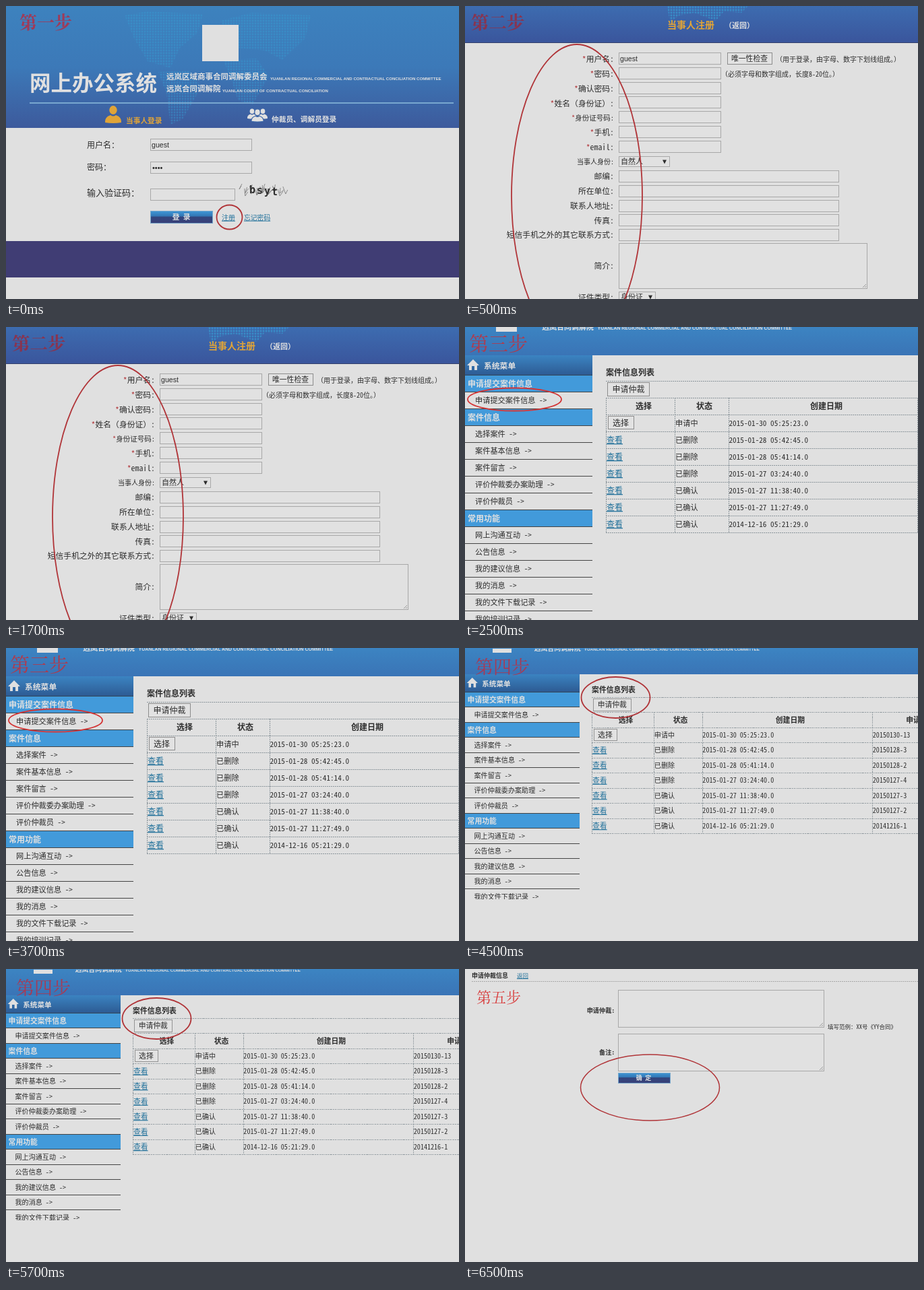
Animation of 672 by 435 pixels, one loop 8 s. Source, as an HTML page:

```html
<!DOCTYPE html>
<html lang="zh-CN">
<head>
<meta charset="utf-8">
<title>五步申请</title>
<style>
html, body { margin: 0; width: 100%; height: 100%; overflow: hidden; background: #e0e0e0; }
svg { display: block; width: 672px; height: 435px; }
rect { shape-rendering: crispEdges; }
text { font-family: "Noto Sans Mono CJK SC", "Noto Sans CJK SC", "Noto Sans CJK", monospace; white-space: pre; }
.arial { font-family: "Liberation Sans", Arial, sans-serif; }
.code { font-family: "DejaVu Sans Mono", monospace; }
.step { font-family: "Noto Serif CJK SC", "Noto Sans CJK SC", "Noto Sans CJK", serif; }
.link { fill: #20709a; text-decoration: underline; }
.grid { shape-rendering: crispEdges; }
</style>
</head>
<body>
<svg id="stage" viewBox="0 0 672 435"></svg>
<script>
const INK = '#2c2c2c', PALE = '#e0e0e0', GOLD = '#e0a438', RED = '#b03438';

// y is the vertical middle of the glyphs
const text = (x, y, size, str, fill = INK, more = '') =>
  `<text x="${x}" y="${y + size * .37}" font-size="${size}" fill="${fill}" ${more}>${str}</text>`;
const bold = (x, y, size, str, fill, more = '') => text(x, y, size, str, fill, 'font-weight="700" ' + more);
const arial = (x, y, size, str, fill) => text(x, y, size, str, fill, 'class="arial"');
const caps = (x, y, size, str) => bold(x, y, size, str, PALE, 'class="arial"');
const link = (x, y, size, str) => text(x, y, size, str, '', 'class="link"');
const step = (x, y, size, str, fill, weight = 600) =>
  text(x, y, size, str, fill, `class="step" font-weight="${weight}"`);
const rect = (x, y, w, h, fill, more = '') =>
  `<rect x="${x}" y="${y}" width="${w}" height="${h}" fill="${fill}" ${more}/>`;
const path = (d, stroke, more = '') => `<path d="${d}" fill="none" stroke="${stroke}" ${more}/>`;
const ring = (cx, cy, rx, ry, width = 1.8, color = RED) =>
  `<ellipse cx="${cx}" cy="${cy}" rx="${rx}" ry="${ry}" fill="none" stroke="${color}" stroke-width="${width}"/>`;
const field = (x, y, w, h) => rect(x + .5, y + .5, w - 1, h - 1, '#e1e1e1', 'stroke="#a8a8a8"');
const area = (x, y, w, h) => field(x, y, w, h) +
  path(`M${x + w - 7} ${y + h - 2}l5 -5m-2 5l2 -2`, '#888', 'stroke-width=".8"');
const button = (x, y, w, h) => rect(x + .5, y + .5, w - 1, h - 1, '#e2e2e2', 'stroke="#8c8c8c"');
const submit = (x, y, w, h, size, str, mid) =>
  rect(x, y, w, h, 'url(#glossy)', 'stroke="#78a8cc"') +
  bold(mid, y + h / 2 + .5, size, str, PALE, 'text-anchor="middle"');
const select = (x, y, w, str) => field(x, y, w, 16) + text(x + 3, y + 8, 11, str) +
  `<path d="M${x + w - 11} ${y + 5.5}h6l-3 6z" fill="${INK}"/>`;
const person = (x, y, s, fill) => `<g transform="translate(${x} ${y}) scale(${s})" fill="${fill}">
  <ellipse cy="-6.5" rx="5.7" ry="6.5"/><path d="M-12 12Q-13 4 -4 1Q0 4 4 1Q13 4 12 12Q0 14 -12 12z"/></g>`;

const gradient = (id, ...colors) => `<linearGradient id="${id}" x2="0" y2="1">${
  colors.map((c, i) => `<stop offset="${i / (colors.length - 1)}" stop-color="${c}"/>`).join('')}</linearGradient>`;
const defs = `<defs>
  ${gradient('banner', '#3d82be', '#3c79b8', '#3d5a9c')}
  ${gradient('strip', '#3d6cb0', '#3a559c')}
  ${gradient('top', '#3c84c2', '#3a74b6')}
  ${gradient('menu', '#3b84c2', '#2d5a92')}
  <linearGradient id="glossy" x2="0" y2="1"><stop stop-color="#3f98d8"/><stop offset=".45" stop-color="#3276b4"/>
    <stop offset=".5" stop-color="#32467e"/><stop offset="1" stop-color="#384078"/></linearGradient>
  <pattern id="dots" width="4" height="4" patternUnits="userSpaceOnUse"><circle cx="2" cy="2" r="1.4" fill="#369cd2"/></pattern>
</defs>`;

const ORG = '远岚区域商事合同调解委员会';
const ORG_EN = 'YUANLAN REGIONAL COMMERCIAL AND CONTRACTUAL CONCILIATION COMMITTEE';
const COURT = '远岚合同调解院';
const COURT_EN = 'YUANLAN COURT OF CONTRACTUAL CONCILIATION';
const USER = 'guest';

function login() {
  let noise = '';
  for (let i = 0; i < 17; i++) {
    const x = 350 + i * 3.8, y = 264 + (i * 7) % 9;
    noise += `M${x} ${y}l${(i * 5) % 9 - 4} ${8 + (i * 3) % 5}l${3 + i % 4} ${-5 - i % 3}`;
  }
  return rect(0, 0, 672, 181, 'url(#banner)') +
    `<path d="M176 14L210 8 292 12 284 40 258 62 244 92 210 82 190 48zM226 98L272 96 290 120 262 168 244 176 238 130z
      M318 22L364 10 452 14 444 48 410 80 384 66 340 62zM322 80L372 78 390 104 366 146 344 140 334 108z"
      fill="url(#dots)" opacity=".45"/>` +
    step(20, 24, 26, '第一步', '#a03a58') +
    rect(291, 28, 54, 54, PALE) +
    text(35, 114, 31.5, '网上办公系统', PALE, 'font-weight="900"') +
    bold(238, 105, 11.5, ORG, PALE) + caps(392, 108, 6.1, ORG_EN) +
    bold(238, 123, 11.5, COURT, PALE) + caps(321, 125.5, 6.1, COURT_EN) +
    path('M35 144H664', '#8cbcdc', 'stroke-width="1.5"') +
    person(159, 161, 1, GOLD) + bold(178, 170, 10.7, '当事人登录', GOLD) +
    person(365, 160, .58, PALE) + person(381, 160, .58, PALE) +
    `<g stroke="#3c66a8" stroke-width="1.5">${person(373, 162.5, .74, PALE)}</g>` +
    bold(394, 168, 10.7, '仲裁员、调解员登录', PALE) +
    text(120, 207, 12, '用户名：') + field(214, 197, 151, 18) + arial(216, 206.5, 10.6, USER) +
    text(120, 240, 12, '密码：') + field(214, 231, 151, 18) + arial(217, 240, 11, '••••') +
    text(120, 277, 13, '输入验证码：') + field(214, 271, 126, 18) +
    path(noise, '#777', 'stroke-width=".8"') +
    [...'bsyt'].map((c, i) => bold(361 + i * 11, 272 + i, 15, c, '#303030', 'class="code"')).join('') +
    submit(214, 304, 92, 18, 10.7, '登 录', 260) +
    link(320, 314, 10, '注册') + link(353, 314, 9.8, '忘记密码') +
    ring(331.5, 313.5, 19, 18) +
    rect(0, 349, 672, 54, '#403d74');
}

function register() {
  const labels = ['*用户名', '*密码', '*确认密码', '*姓名（身份证）', '*身份证号码', '*手机', '*email',
    '当事人身份', '邮编', '所在单位', '联系人地址', '传真', '短信手机之外的其它联系方式', '简介', '证件类型'];
  const rows = labels.map((str, i) => {
    const y = i < 13 ? 79 + i * 21.75 : i < 14 ? 386 : 432.5;
    const size = i == 4 ? 10.5 : i == 7 ? 10 : 11.8;
    const label = str.replace('*', `<tspan fill="${RED}">*</tspan>`) + ':';
    const box = i < 7 ? field(228, Math.round(y - 10), 152, 18)
      : i > 7 && i < 13 ? field(228, Math.round(y - 9), 327, 18) : '';
    return text(221, y, size, label, INK, 'text-anchor="end"') + box;
  }).join('');
  return rect(0, 0, 672, 55, 'url(#strip)') + rect(0, 54, 672, 1, '#34406c') +
    '<path d="M300 0H420L410 10 384 8 372 22 340 10 318 14 304 24z" fill="url(#dots)" opacity=".7"/>' +
    step(9, 24, 26.5, '第二步', '#883450') +
    bold(300, 28, 14, '当事人注册', GOLD) + bold(385, 29, 11, '（返回）', PALE) +
    rows + arial(230, 78.5, 10.6, USER) +
    button(389, 69, 67, 18) + text(395, 78.5, 10.8, '唯一性检查') +
    text(461, 79, 10, '（用于登录，由字母、数字下划线组成。）') +
    text(380, 101, 10, '（必须字母和数字组成，长度8-20位。）') +
    select(228, 223, 76, '自然人') + area(228, 352, 369, 68) + select(228, 424, 55, '身份证') +
    ring(166, 282, 97, 225);
}

function cases() {
  const side = 189.4;
  const menu = ['#申请提交案件信息', '申请提交案件信息', '#案件信息', '选择案件', '案件基本信息', '案件留言',
    '评价仲裁委办案助理', '评价仲裁员', '#常用功能', '网上沟通互动', '公告信息', '我的建议信息', '我的消息',
    '我的文件下载记录', '我的培训记录'].map((str, i) => {
    const y = 72 + i * 25;
    return (str[0] == '#'
      ? rect(0, y, side, 24, '#429ada') + bold(4, y + 12.5, 12, str.slice(1), PALE)
      : text(15, y + 12.3, 11.2, str + ' -&gt;')) + rect(0, y + 24, side, 1, '#444');
  }).join('');
  const list = ['申请中|2015-01-30 05:25:23.0|13', '已删除|2015-01-28 05:42:45.0|3', '已删除|2015-01-28 05:41:14.0|2',
    '已删除|2015-01-27 03:24:40.0|4', '已确认|2015-01-27 11:38:40.0|3', '已确认|2015-01-27 11:27:49.0|2',
    '已确认|2014-12-16 05:21:29.0|1'].map((row, i) => {
    const [state, date, n] = row.split('|'), y = 142.7 + i * 25;
    return (i ? link(210, y, 12, '查看') : button(212, 132, 39, 20) + text(219, y, 12, '选择')) +
      text(312, y, 11.2, state) + text(391.5, y, 11.2, date) +
      text(672, y, 11.2, date.slice(0, 10).replaceAll('-', '') + '-' + n);
  }).join('');
  let grid = 'M209 80.5H760M209.5 105V305M311.5 105V305M391.5 105V305M671.5 105V305';
  for (let y = 105.5; y < 306; y += 25) grid += `M209 ${y}H760`;
  const heads = [[265, '选择'], [355, '状态'], [536, '创建日期'], [751, '申请编号']]
    .map(([x, str]) => bold(x, 118, 12, str, INK, 'text-anchor="middle"')).join('');
  return rect(0, 0, 760, 42, 'url(#top)') + rect(46, -24, 31, 31, PALE) +
    bold(114, 0, 11, COURT, PALE) + caps(196.5, 1.5, 6.95, ORG_EN) +
    rect(0, 42, side, 30, 'url(#menu)') + rect(0, 71, side, 1, '#345') +
    `<path d="M3 57L12 48 21 57H18V64H14V58H10V64H6V57z" fill="${PALE}"/>` +
    bold(28, 58, 11.8, '系统菜单', PALE) + menu +
    bold(209, 68, 12, '案件信息列表') +
    path(grid, '#8c969c', 'class="grid" stroke-dasharray="2 1"') +
    button(211, 82, 63, 21) + text(218.5, 93, 12, '申请仲裁') + heads + list;
}

const pickMenu = () => cases() + step(6, 25, 29, '第三步', '#b03a4c', 500) + ring(73.5, 107.5, 69.5, 17, 1.8, '#d43434');

const pickButton = () => `<g transform="translate(0 .8) scale(.9)">${cases()}</g>` +
  rect(0, 0, 672, 1, '#3c84c2') + rect(0, 373, 672, 62, PALE) +
  step(15, 28, 27, '第四步', '#a83a54', 500) + ring(223.5, 73.5, 51, 30.5);

const apply = () => bold(10, 10, 9, '申请仲裁信息') + link(77, 10, 8.5, '返回') +
  path('M10 18.5H672', '#a8a8a8', 'class="grid" stroke-dasharray="2 1"') +
  step(17, 42, 22, '第五步', '#d83a3a', 400) +
  bold(222, 62, 9.2, '申请仲裁:', INK, 'text-anchor="end"') + area(227, 31, 306, 56) +
  text(538, 85.5, 8.5, '填写范例：XX号《YY合同》') +
  bold(222, 124, 9.2, '备注:', INK, 'text-anchor="end"') + area(227, 96, 306, 56) +
  submit(227, 154, 77, 15, 9, '确 定', 265) + ring(274.5, 176, 103, 49, 1.5);

const stage = document.getElementById('stage');
const scenes = [[0, login], [500, register], [2500, pickMenu], [4500, pickButton], [6500, apply]];
stage.innerHTML = defs + scenes.map(([, draw]) => `<g display="none">${draw()}</g>`).join('');
const groups = [...stage.children].slice(1);
const start = performance.now();

function tick() {
  const t = (performance.now() - start) % 8000;
  const now = scenes.findLastIndex(([from]) => t >= from);
  groups.forEach((g, i) => g.setAttribute('display', i == now ? 'inline' : 'none'));
  requestAnimationFrame(tick);
}
tick();
</script>
</body>
</html>
```
